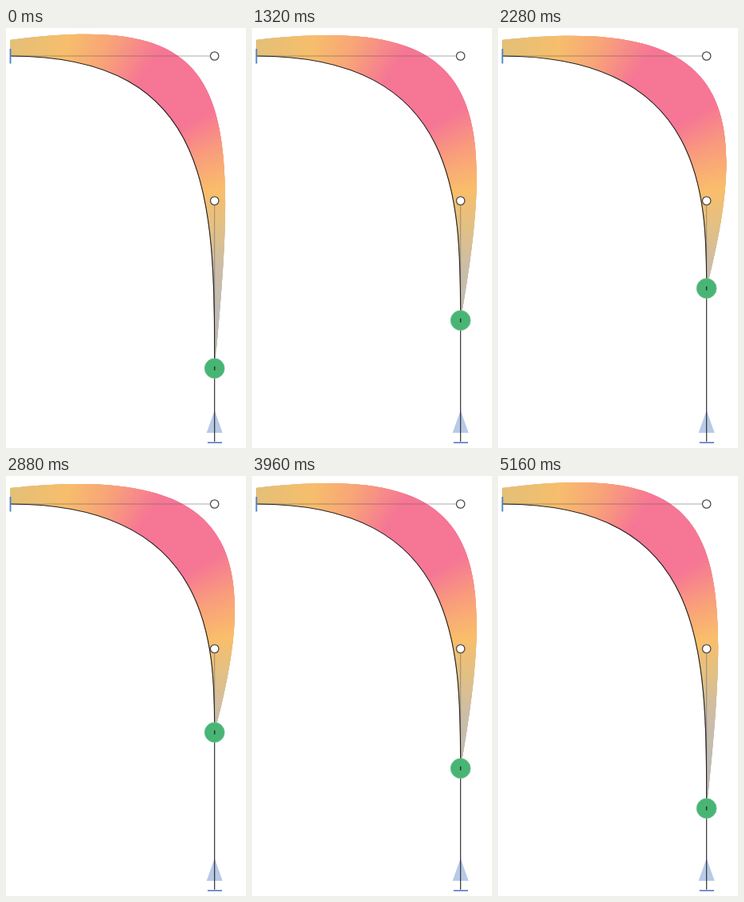
Animation, 300 px wide and 525 px high, one loop 5280 ms. Source, as an HTML page with a canvas:

```html
<!DOCTYPE html>
<html>
<head>
<meta charset="utf-8">
<style>
html, body { margin: 0; width: 100%; height: 100%; overflow: hidden; background: #fff; }
canvas { display: block; }
</style>
</head>
<body>
<canvas id="stage" width="300" height="525"></canvas>
<script>
const ctx = document.getElementById('stage').getContext('2d');
const STEP = 120, STEPS = 44;
const AXIS = 260.7, TOP = 35, LEFT = 5, HANDLE = 216, BOTTOM = 517;
const BAND_END = 402;
const LOWEST = 425.5;
const GREY = [192, 187, 182];

// Colour stops along the curve: parameter, then rgb
const STOPS = [
  [0, 226, 192, 120], [.1, 247, 190, 108], [.18, 248, 164, 120],
  [.28, 246, 118, 149], [.45, 246, 118, 149], [.54, 249, 157, 124],
  [.635, 249, 190, 107], [.72, 227, 192, 132], [.82, 204, 189, 168], [.93, ...GREY]
];

const mix = (a, b, u) => a + (b - a) * u;

function colorAt(t) {
  const i = STOPS.findIndex(s => s[0] > t);
  if (i < 0) return `rgb(${GREY})`;
  const a = STOPS[i - 1], b = STOPS[i], u = (t - a[0]) / (b[0] - a[0]);
  return `rgb(${[1, 2, 3].map(k => mix(a[k], b[k], u))})`;
}

function line(x1, y1, x2, y2, color, width) {
  ctx.beginPath();
  ctx.moveTo(x1, y1);
  ctx.lineTo(x2, y2);
  ctx.strokeStyle = color;
  ctx.lineWidth = width;
  ctx.stroke();
}

function dot(x, y, r, fill, stroke, width) {
  ctx.beginPath();
  ctx.arc(x, y, r, 0, 7);
  ctx.fillStyle = fill;
  ctx.fill();
  ctx.strokeStyle = stroke;
  ctx.lineWidth = width;
  ctx.stroke();
}

function spine(y) {
  ctx.beginPath();
  ctx.moveTo(LEFT, TOP);
  ctx.bezierCurveTo(AXIS, TOP, AXIS, HANDLE, AXIS, y);
}

// Bands of colour run across the curve
function bands() {
  for (let t = 0; t <= 1; t += .004) {
    const s = 1 - t;
    const x = AXIS - (AXIS - LEFT) * s ** 3;
    const y = TOP * (s ** 3 + 3 * s * s * t) + HANDLE * 3 * s * t * t + BAND_END * t ** 3;
    const dx = (AXIS - LEFT) * s * s;
    const dy = 2 * s * t * (HANDLE - TOP) + t * t * (BAND_END - HANDLE);
    const k = 90 / Math.hypot(dx, dy);
    line(x - dy * k * .1, y + dx * k * .1, x + dy * k, y - dx * k, colorAt(t), 7);
  }
}

function ribbon(y) {
  const u = (LOWEST - y) / 100;
  ctx.save();
  spine(y);
  ctx.bezierCurveTo(mix(295, 322, u), mix(72, 85, u), 281, mix(-21, -15, u), LEFT, 15);
  ctx.closePath();
  ctx.clip();
  ctx.fillStyle = `rgb(${GREY})`;
  ctx.fillRect(0, 0, 300, 525);
  bands();
  ctx.restore();
}

function draw(y) {
  ctx.clearRect(0, 0, 300, 525);
  ribbon(y);

  line(LEFT, 35, AXIS, 35, 'rgba(90,90,90,.5)', 1);
  line(AXIS, HANDLE, AXIS, y, 'rgba(90,90,90,.5)', 1);

  ctx.fillStyle = '#b7cae6';
  ctx.beginPath();
  ctx.moveTo(AXIS, 478);
  ctx.lineTo(AXIS - 10, 506);
  ctx.lineTo(AXIS + 10, 506);
  ctx.fill();

  spine(y);
  ctx.lineTo(AXIS, BOTTOM);
  ctx.strokeStyle = '#222';
  ctx.lineWidth = 1.1;
  ctx.stroke();

  line(5.5, 26, 5.5, 44.5, '#4b7fc0', 1.8);
  line(252, 518.3, 270, 518.3, '#4b6fc0', 1.5);
  dot(AXIS, 35, 5.2, '#fff', '#4a4a4a', 1.3);
  dot(AXIS, HANDLE, 5.2, '#fff', '#4a4a4a', 1.3);
  dot(AXIS, y, 12.4, '#48b575', '#6fc093', .8);
  line(AXIS, y - 2.5, AXIS, y + 2.5, '#23382b', 1.5);
}

function tick(now) {
  const step = Math.floor(now / STEP) % STEPS;
  // Steady travel up and back, with one longer step at the lowest point
  const travel = STEPS / 2 - Math.abs(step - STEPS / 2);
  draw(step ? 420.5 - 5 * travel : LOWEST);
  requestAnimationFrame(tick);
}
tick(0);
</script>
</body>
</html>
```
